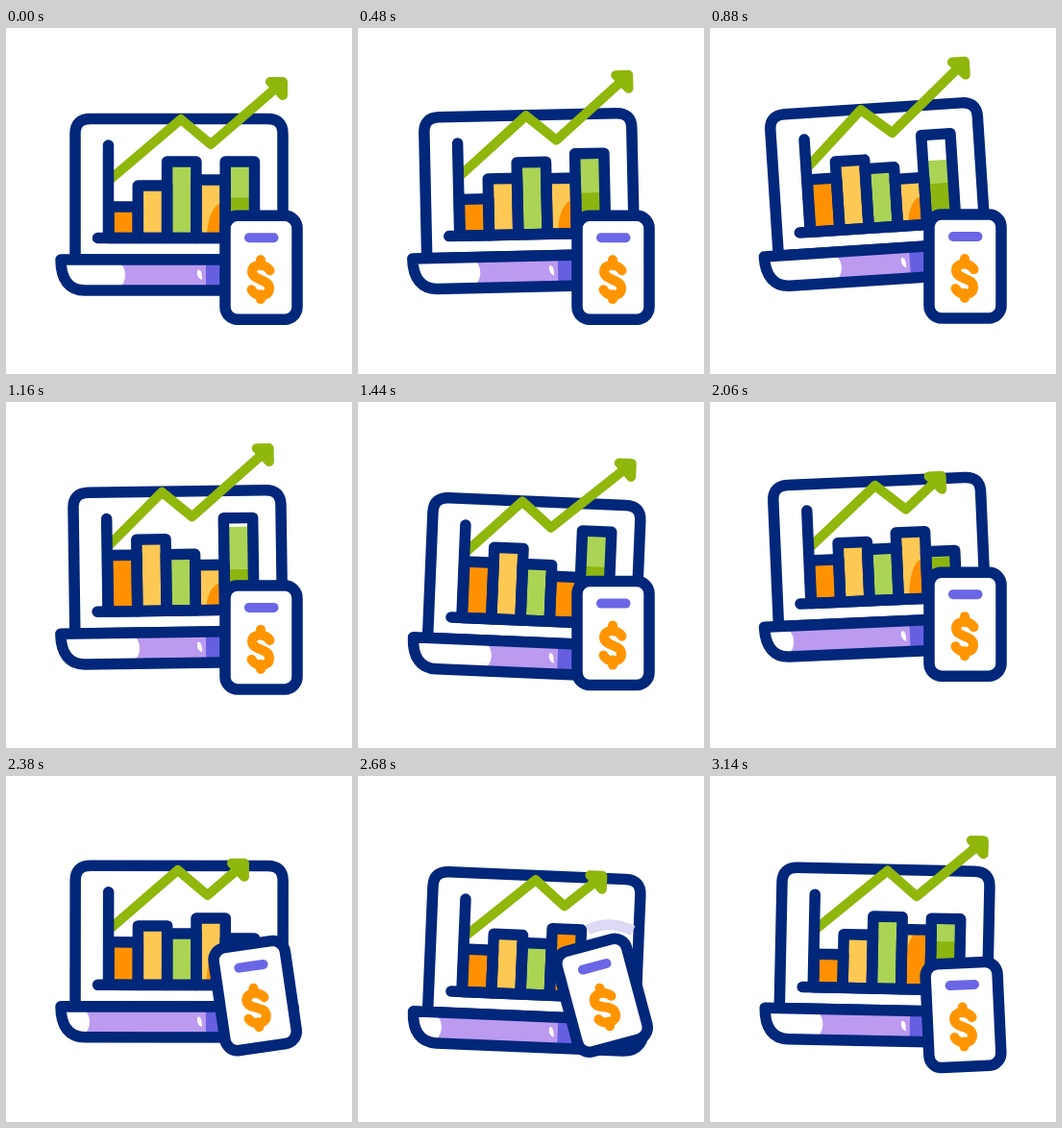
Write an HTML page that moves like this. It is 360 px wide and 360 px high and loops after 3160 ms.

```html
<!DOCTYPE html>
<html lang="en">
<head>
<meta charset="utf-8">
<title>Growth chart</title>
<style>
  html, body { margin: 0; width: 100%; height: 100%; overflow: hidden; background: #fff; }
  svg { display: block; width: 100vw; height: 100vh; }
  .line { fill: none; stroke: #00277a; stroke-width: 11.5; stroke-linecap: round; stroke-linejoin: round; }
  .green { fill: none; stroke: #8fb70c; stroke-width: 10; stroke-linejoin: round; }
</style>
</head>
<body>
<svg viewBox="0 0 360 360">
  <defs>
    <path id="base" d="M57 241H299C299 262 292 273 276 273H82C66 273 57 262 57 241Z"/>
    <clipPath id="baseClip"><use href="#base"/></clipPath>
    <clipPath id="barClip"><rect id="barClipRect" x="198" width="30"/></clipPath>
  </defs>
  <g id="laptop">
    <path class="line" style="fill:#fff" d="M72 241V110Q72 94.5 88 94.5H272Q288 94.5 288 110V241Z"/>
    <g clip-path="url(#baseClip)">
      <rect x="50" y="240" width="260" height="36" fill="#fff"/>
      <rect id="shade" y="240" height="36" fill="#bb9af0"/>
      <ellipse id="shine" cy="257" rx="12" ry="15" fill="#fff"/>
      <rect x="208" y="240" width="100" height="36" fill="#665fe0"/>
      <path d="M199 252Q204 249 204 262Q198 260 199 252Z" fill="#fff"/>
    </g>
    <use href="#base" class="line"/>
    <g id="bars"></g>
    <path id="arrow" class="green"/>
    <path class="line" d="M106.5 122V218.5M95.5 218.5H264"/>
    <path id="head" class="green" stroke-linecap="round" d="M-13 0H0V14L-11 2"/>
  </g>
  <path id="trail" d="M239 160Q262 149 286 161" fill="none" stroke="#ddd8f4" stroke-width="11"/>
  <g id="phone">
    <rect class="line" style="fill:#fff" x="-37.5" y="-54" width="75" height="108" rx="13"/>
    <path d="M-12.5 -31H13" stroke="#6a66e6" stroke-width="10" stroke-linecap="round"/>
    <path d="M9 3C5 -4 -9 -5 -9.500 4C-9.500 14 9 11 8.500 22C8 32 -7 30 -10 23M-.5 -8V-3M-.5 28V33"
      fill="none" stroke="#ff9500" stroke-width="10" stroke-linecap="round" stroke-linejoin="round"/>
  </g>
</svg>
<script>
const LOOP = 3160, FLOOR = 218.5, LEFT = 95.5, BAR_WIDTH = 30.3;

// The laptop rocks from one extreme to the next; the last swing is cut by the loop.
const rocking = [
  { time: 220, tilt: 0, floor: FLOOR },
  { time: 880, tilt: -3.7, floor: 213 },
  { time: 1460, tilt: 2.4, floor: 224 },
  { time: 2060, tilt: -2.5, floor: 210 },
  { time: 2680, tilt: 2.4, floor: 224 },
  { time: 3600, tilt: 0, floor: 215 }
];
// Each bar changes by `rise`, then by `fold`, and finally returns to its rest height.
const bars = [
  { color: "#ff9100", rest: 32.5, rise: 26, fold: -14 },
  { color: "#fdc853", rest: 54.5, rise: 20, fold: -13 },
  { color: "#abd455", rest: 79.5, rise: -21, fold: -5 },
  { color: "#fdc853", rest: 60.5, rise: -13.5, fold: 22.5 },
  { color: "#abd455", rest: 79.5, rise: 16, fold: -47 }
];

const $ = id => document.getElementById(id);
const set = (el, attrs) => { for (const k in attrs) el.setAttribute(k, attrs[k]); };
function make(tag, parent, attrs) {
  const el = document.createElementNS("http://www.w3.org/2000/svg", tag);
  set(el, attrs);
  return parent.appendChild(el);
}
function ramp(t, start, end) {
  const u = Math.min(1, Math.max(0, (t - start) / (end - start)));
  return u * u * (3 - 2 * u);
}
const standing = height => ({ y: FLOOR - height, height });

const group = $("bars");
const column = i => ({ x: 107 + i * BAR_WIDTH, width: BAR_WIDTH });
const fills = bars.map((bar, i) => make("rect", group, { ...column(i), fill: bar.color }));
fills[4].before(make("rect", group, { ...column(4), fill: "#fff" }));
const whiteBar = fills[4].previousSibling;
const blob = make("ellipse", group, {
  cx: 225, cy: FLOOR, fill: "#ff9100", "clip-path": "url(#barClip)" });
const darkGreen = make("rect", group, { ...column(4), fill: "#8db510" });
const outlines = bars.map((_, i) => make("rect", group, { ...column(i), class: "line" }));

function rock(t, key) {
  return rocking.slice(1).reduce((value, beat, i) =>
    value + (beat[key] - rocking[i][key]) * ramp(t, rocking[i].time, beat.time),
    rocking[0][key]);
}

function draw(t) {
  const tilt = rock(t, "tilt"), floor = rock(t, "floor"), lean = Math.max(0, tilt);
  const rise = ramp(t, 220, 1100), fold = ramp(t, 1440, 1900);
  const stay = 1 - ramp(t, 2700, 3300);
  const blend = (rest, up, down) => rest + (up * rise + down * fold) * stay;

  set($("laptop"), { transform:
    `translate(${LEFT + 0.6 * tilt} ${floor}) rotate(${tilt}) translate(${-LEFT} ${-FLOOR})` });

  const heights = bars.map(bar => blend(bar.rest, bar.rise, bar.fold));
  heights.forEach((height, i) => {
    set(outlines[i], standing(height));
    set(fills[i], standing(height));
  });
  set($("barClipRect"), standing(heights[3]));
  set(blob, { rx: 16 + 10 * lean, ry: 0.6 * heights[3] + 25 * lean });
  set(whiteBar, standing(heights[4]));
  set(fills[4], standing(Math.min(heights[4], 92 + 7 * tilt)));
  set(darkGreen, standing(Math.min(heights[4], 42 + 7 * lean)));

  const peak = blend(182, -17.5, 14), top = blend(95, 0, 4), reach = blend(1, 0.08, -0.57);
  const tipX = peak + 31 + 75 * reach, tipY = top + 26 - 65 * reach;
  const startY = top + 62 - (182 - peak) * 0.45;
  set($("arrow"), { d:
    `M109 ${startY}L${peak} ${top}L${peak + 31} ${top + 26}L${tipX - 2} ${tipY + 2}` });
  set($("head"), { transform: `translate(${tipX} ${tipY})` });

  const shade = blend(118, 15, -52);
  set($("shade"), { x: shade, width: 210 - shade });
  set($("shine"), { cx: shade - 6 });

  const turn = ramp(t, 2060, 2660) * stay;
  const lift = ramp(t, 600, 2500) * (1 - ramp(t, 2700, 3200));
  set($("phone"), { transform:
    `translate(${265.5 - 11.5 * turn} ${249.3 - 21 * lift}) rotate(${-15 * turn})` });
  set($("trail"), { opacity: ramp(turn, 0.95, 1) });
}

function frame() {
  draw(Math.floor(performance.now() % LOOP / 20) * 20);
  requestAnimationFrame(frame);
}
frame();
</script>
</body>
</html>
```
